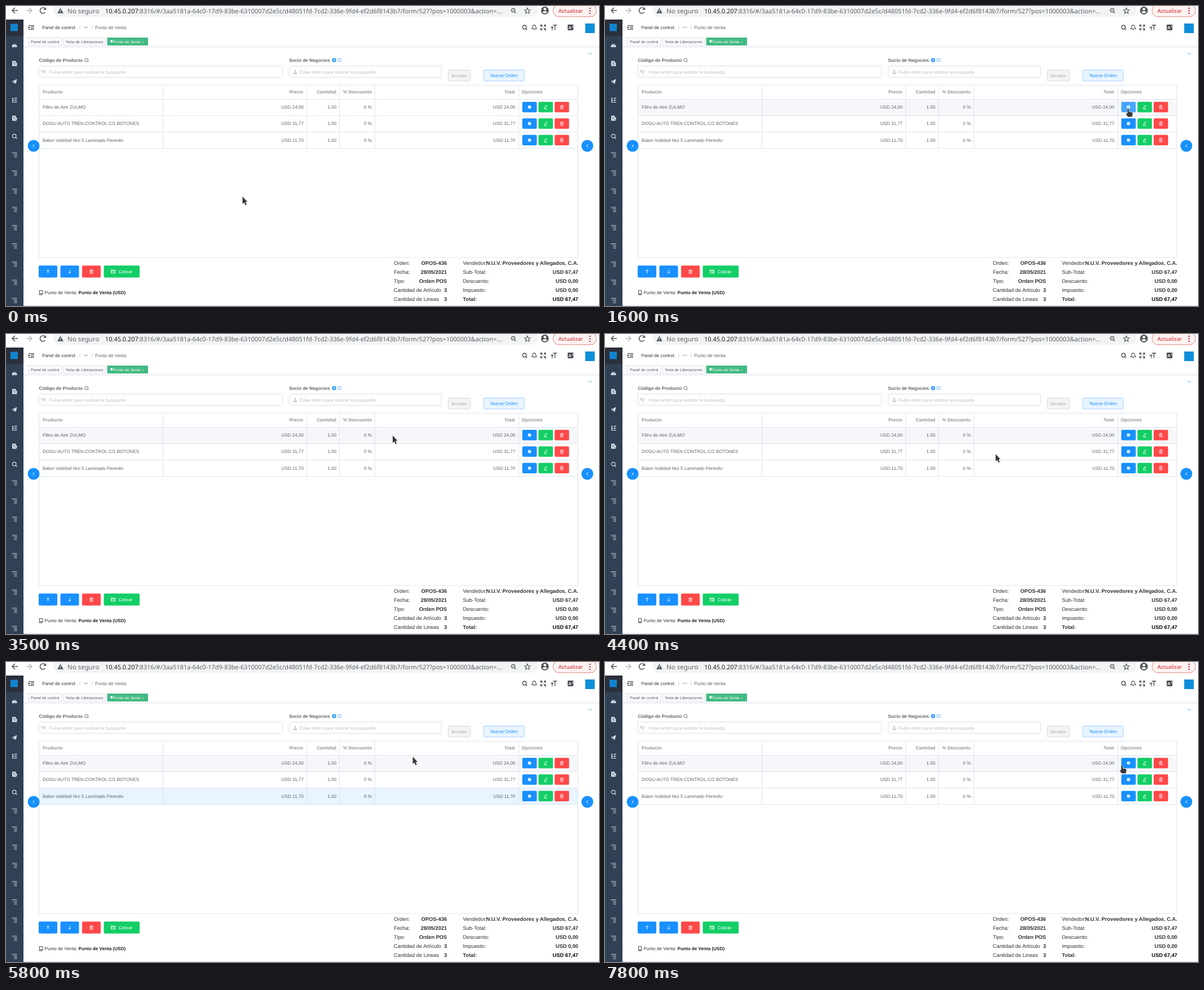
An HTML page for the animation above (8 s loop, 1052 by 532 pixels).

```html
<!DOCTYPE html>
<html lang="es">
<head>
<meta charset="utf-8">
<title>Punto de Venta</title>
<style>
  html, body { margin: 0; width: 100%; height: 100%; overflow: hidden; background: #fff; }
  svg { display: block; width: 1052px; height: 532px; }
  text { font-family: "Liberation Sans", Arial, sans-serif; text-rendering: geometricPrecision; white-space: pre; }
  .chrome { font-family: "Noto Sans", "Open Sans", sans-serif; }
  .bold { font-weight: bold; }
</style>
</head>
<body>
<svg id="stage" viewBox="0 0 1052 532" xmlns="http://www.w3.org/2000/svg"></svg>
<script>
const BLUE = '#1890ff', GREEN = '#13ce66', RED = '#ff4949', GREY = '#606266', DARK = '#303133', LINE = '#dfe4ec';
const LOOP = 8000;
let out = '';

const rect = (x, y, w, h, fill, extra = '') => {
  out += `<rect x="${x}" y="${y}" width="${w}" height="${h}" fill="${fill}" ${extra}/>`;
};
const box = (x, y, w, h, fill, stroke, r = 2) => rect(x, y, w, h, fill, `stroke="${stroke}" rx="${r}"`);
const circle = (x, y, r, fill) => { out += `<circle cx="${x}" cy="${y}" r="${r}" fill="${fill}"/>`; };
const text = (x, y, s, fill = GREY, size = 8.15, cls = '', anchor = 'start') => {
  out += `<text x="${x}" y="${y}" fill="${fill}" font-size="${size}" class="${cls}" text-anchor="${anchor}">${s}</text>`;
};
const right = (x, y, s, fill, size, cls) => text(x, y, s, fill, size, cls, 'end');
const icon = (x, y, d, stroke, width = 1, fill = 'none') => {
  out += `<path transform="translate(${x} ${y})" d="${d}" stroke="${stroke}" stroke-width="${width}" fill="${fill}"/>`;
};
const solid = (x, y, d, fill) => icon(x, y, d, 'none', 0, fill);

const ICON = {
  search: 'M2.2 2.2L4.5 4.5M3-.4A3.3 3.3 0 1 1-3.6-.4A3.3 3.3 0 1 1 3-.4',
  smallSearch: 'M1.9 1.9L3.4 3.4M2.7-.2A2.9 2.9 0 1 1-3.1-.2A2.9 2.9 0 1 1 2.7-.2',
  trash: 'M-3-2H3M-1-2V-3.2H1V-2M-2.2-2V3.2H2.2V-2M-.7-.5V1.8M.7-.5V1.8',
  pencil: 'M-2 1L1-3 2.4-2-.6 2-2.3 2.5ZM-2.8 3.6H3',
  list: 'M-4.5-4H4.5M0-1.4H4.5M0 1.2H4.5M0 3.8H4.5M-2.5-1.4H-1.2M-1.3 1.2H-.8M-1.3 3.8H-.8',
  cart: 'M-4-3H-2.5L-1.5 1H2.5L3.5-2H-2M-1 3H-.5M2 3H2.5',
  user: 'M-1.8-2A1.8 1.8 0 1 1 1.8-2A1.8 1.8 0 1 1-1.8-2M-3.5 3.5Q-3.5 .5 0 .5T3.5 3.5Z',
  doc: 'M-3.5-4H2V-1H4V4H-3.5Z',
  left: 'M1.3-2.5L-1.3 0 1.3 2.5',
  right: 'M-1.3-2.5L1.3 0-1.3 2.5',
};

function browserBar() {
  rect(84, -6, 859, 25, '#f1f3f4', 'rx="12"');
  icon(16, 8, 'M5 0H-5M0-5L-5 0 0 5', '#55585c', 1.6);
  icon(41, 8, 'M-5 0H5M0-5L5 0 0 5', '#b9bbbe', 1.6);
  icon(65.5, 8, 'M4 3A5 5 0 1 1 3.6-3.5L4.6-2.2M4.8-5.2V-1.8H1.4', '#55585c', 1.6);
  solid(96.5, 8.5, 'M0-5L5.5 4.5H-5.5ZM-.6-1.8V1.2H.6V-1.8ZM-.6 2.2V3.4H.6V2.2Z', '#55585c');
  text(109, 13, 'No seguro', '#606367', 11.5, 'chrome');
  const path = ':8316/#/3aa5181a-64c0-17d9-83be-6310007d2e5c/d48051fd-7cd2-336e-9fd4-ef2d6f8143b7/form/527?pos=1000003&amp;action=...';
  text(176, 13, `<tspan fill="#202124">10.45.0.207</tspan>${path}`, '#606367', 10.92, 'chrome');
  icon(900, 8, ICON.search, '#55585c', 1.3);
  icon(900, 8, 'M-2-.4H1.4', '#55585c');
  icon(925, 8.5, 'M0-5L1.5-1.7 5-1.4 2.3 .9 3.2 4.5 0 2.6-3.2 4.5-2.3 .9-5-1.4-1.5-1.7Z', '#55585c', 1.2);
  circle(956, 8, 7, '#55585c');
  circle(956, 5.5, 2.3, '#fff');
  solid(956, 8, 'M-4.3 3Q0-1 4.3 3Q0 7-4.3 3Z', '#fff');
  box(970.5, -2.5, 77, 21.5, '#fdf3f2', '#d9817b', 10.5);
  text(980, 12.3, 'Actualizar', '#c5221f', 9.4, 'chrome');
  [4, 8.5, 13].forEach(y => circle(1036, y, 1.2, '#c5221f'));
}

function sidebar() {
  rect(0, 24, 31, 508, '#304156');
  rect(0, 24, 31, 29, '#2b2f3a');
  rect(8, 31.5, 13, 13, '#1285cf');
  const tint = '#dbe2ea';
  solid(15, 70, 'M-4.5 3A4.6 4.6 0 1 1 4.5 3ZM-.7 1.5H.7L1.7-2ZM-3 0H-2V1H-3ZM2.4 0H3.4V1H2.4Z', tint);
  icon(15, 102, ICON.doc, tint, 1, tint);
  icon(15, 102, 'M-2-1.5H1M-2 1H2.5', '#304156', 1);
  solid(15, 134, 'M4.5-4.5L2.5 4 0 2-1.5 4.2V1.2L2.5-2.5-2.3 .8-4.5-.3Z', tint);
  icon(15, 167, 'M-4-3.5H-2M0-3.5H4.5M-3-3V3.5H-1M-3 0H-1M0 0H4.5M0 3.5H4.5', tint, 1.3);
  icon(15, 199, ICON.doc, tint, 1, tint);
  icon(15, 199, 'M-2-1.5H1M-2 1H0M1 1L4 4', '#304156', 1);
  icon(15, 231, ICON.search, tint, 1.2);
  for (let i = 0; i < 9; i++) icon(15, 264 + i * 32.3, ICON.list, tint, .9);
}

function navbar() {
  icon(45, 38, 'M-5-3.5H5M-1-1.2H5M-1 1.2H5M-5 3.5H5M-4.8-1.6V1.6L-2.6 0Z', DARK, 1);
  text(64, 40.8, 'Panel de control', DARK);
  text(130, 40.8, '/', '#a0a5ae');
  [139, 141.6, 144.2].forEach(x => circle(x, 38, .8, GREY));
  text(151.5, 40.8, '/', '#a0a5ae');
  text(158, 40.8, 'Punto de Venta', GREY);

  icon(920, 38, ICON.search, '#45494f', 1.4);
  icon(937, 38, 'M-4.3 2.5H4.3L3 .8V-1A3 3 0 0 0-3-1V.8ZM-1 4.5H1M0-4V-5', '#45494f', 1.1);
  icon(953, 38, 'M-4.3-1.5V-4.3H-1.5M1.5-4.3H4.3V-1.5M4.3 1.5V4.3H1.5M-1.5 4.3H-4.3V1.5M-4-4L-1.2-1.2M4-4L1.2-1.2M4 4L1.2 1.2M-4 4L-1.2 1.2', '#45494f', 1.2);
  icon(972, 38, 'M-1.5-4H5.5M2-4V4.8M-5.5-.5H-.5M-3-.5V4.8', '#45494f', 1.3);
  rect(996.5, 33, 10, 10, '#45494f', 'rx="1"');
  text(997.8, 40.7, 'A', '#fff', 7.5, 'bold');
  icon(1004.5, 35.5, 'M-1 0H1.5M-1 2H1.5', '#fff', .7);
  rect(1027.5, 31, 17, 17, '#0e8ed8');

  box(39.5, 56.5, 59, 13, '#fff', '#d8dce5', 0);
  text(44, 65.5, 'Panel de control', '#495060', 7);
  box(102.5, 56.5, 73.5, 13, '#fff', '#d8dce5', 0);
  text(106.5, 65.5, 'Nota de Liberaciones', '#495060', 7);
  rect(179.5, 56, 72.5, 14, '#42b983');
  circle(187.3, 62.6, 2.3, '#fff');
  text(190.5, 65.5, 'Punto de Venta', '#fff', 7);
  icon(242.8, 63.6, 'M-1.2-1.2L1.2 1.2M1.2-1.2L-1.2 1.2', '#d5f0e3', .7);
  rect(31, 72, 1021, 1, '#d8dce5');
}

function orderForm() {
  icon(1036.5, 84.5, 'M-3.2-1.5L0 1.5 3.2-1.5', '#5aaef8', 1);
  text(58.5, 99, 'Código de Producto', GREY, 8.15, 'bold');
  icon(143, 96, ICON.smallSearch, GREY, .9);
  text(502, 99, 'Socio de Negocios', GREY, 8.15, 'bold');
  circle(582, 96, 3.6, BLUE);
  icon(582, 96, 'M-2 0H2M0-2V2', '#fff', .9);
  icon(591.5, 96, ICON.smallSearch, '#55aefc', .9);
  box(58.5, 106.5, 432, 20, '#fff', '#dcdfe6');
  box(502.5, 106.5, 270, 20, '#fff', '#dcdfe6');
  icon(66, 117, ICON.cart, '#b4b8c0', 1);
  solid(513, 117, ICON.user, '#c0c4cc');
  [77, 520.5].forEach(x => text(x, 119.7, 'Pulse enter para realizar la busqueda', '#bcc0c9'));
  box(784.5, 113.5, 39.5, 19.5, '#f4f4f5', '#d8d9dc');
  text(804.3, 126, 'Borrador', '#a3a5aa', 7, '', 'middle');
  box(847.5, 113.5, 72, 19.5, '#e8f4ff', '#a3d3ff');
  text(883.5, 126.3, 'Nueva Orden', BLUE, 8.2, '', 'middle');
}

function table() {
  for (let i = 0; i < 3; i++) rect(59, 165 + i * 29.2, 955, 29.2, '#fff', `id="row${i}"`);
  const lines = [279, 534, 592, 655, 910].map(x => `M${x - .5} 140V252`).join('');
  icon(0, 0, `M58.5 140.5H1014.5V446H58.5ZM59 165.5H1014M59 194.5H1014M59 223.5H1014M59 252.5H1014${lines}`, LINE);

  const head = (x, s, anchor) => text(x, 155.3, s, '#909399', 8.15, 'bold', anchor);
  head(65, 'Producto');
  head(527.5, 'Precio', 'end');
  head(586, 'Cantidad', 'end');
  head(649, '% Descuento', 'end');
  head(903, 'Total', 'end');
  head(915, 'Opciones');

  const items = [['Filtro de Aire ZULMO', '24,00'], ['DOGU AUTO TREN CONTROL C/2 BOTONES', '31,77'], ['Balon Voleibol Nro 5 Laminado Perevilo', '11,70']];
  items.forEach(([name, price], i) => {
    const mid = 179.2 + i * 29.3, y = mid + 2.8;
    text(65, y, name);
    right(528, y, 'USD ' + price);
    right(586, y, '1.00');
    right(649, y, '0 %');
    right(903.5, y, 'USD ' + price);
    rect(916, mid - 9.3, 25.6, 18.6, BLUE, `rx="1.8" id="info${i}"`);
    rect(944.7, mid - 9.3, 25.6, 18.6, GREEN, 'rx="1.8"');
    rect(973.3, mid - 9.3, 25.6, 18.6, RED, 'rx="1.8"');
    circle(928.7, mid, 2.9, '#fff');
    icon(928.7, mid, 'M0-2V-1M0-.4V2', BLUE, .9);
    icon(957.3, mid, ICON.pencil, '#fff', .8);
    icon(986, mid, ICON.trash, '#fff', .8);
  });

  circle(49, 248, 10.5, BLUE);
  icon(49, 248, ICON.right, '#fff', 1);
  circle(1031.3, 248, 10.5, BLUE);
  icon(1031.3, 248, ICON.left, '#fff', 1);
}

function footer() {
  [[58, 33, BLUE], [96.5, 33, BLUE], [135, 33, RED], [173.5, 63.5, GREEN]]
    .forEach(([x, w, fill]) => rect(x, 460.3, w, 21.3, fill, 'rx="1.8"'));
  icon(74.5, 471, 'M0 3.3V-3M-2.4-.6L0-3 2.4-.6', '#fff', .9);
  icon(113, 471, 'M0-3.3V3M-2.4 .6L0 3 2.4 .6', '#fff', .9);
  icon(151.5, 471, ICON.trash, '#fff', .9);
  icon(190, 471, 'M-3.5-2.7H3.5V2.7H-3.5ZM-3.5-1H3.5M1 1.2H2.4', '#fff', 1);
  text(199.7, 474, 'Cobrar', '#fff');

  icon(62, 508.3, 'M-2.6-3.8H2.6V3.8H-2.6ZM-2.6 2H2.6', DARK, .9);
  text(68.5, 511, 'Punto de Venta: <tspan class="bold" fill="#1c1d20">Punto de Venta (USD)</tspan>', DARK);

  const summary = [
    ['Orden:', 'OPOS-436', 'Vendedor:', 'N.U.V. Proveedores y Allegados, C.A.'],
    ['Fecha:', '28/05/2021', 'Sub-Total:', 'USD 67,47'],
    ['Tipo:', 'Orden POS', 'Descuento:', 'USD 0,00'],
    ['Cantidad de Artículo', '3', 'Impuesto:', 'USD 0,00'],
    ['Cantidad de Lineas', '3', 'Total:', 'USD 67,47'],
  ];
  summary.forEach(([a, b, c, d], i) => {
    const y = 459.3 + i * 15.9, last = i === 4;
    text(688, y, a, DARK, 9.3);
    right(782.3, y, b, DARK, 9.3, 'bold');
    text(810.5, y, c, DARK, 9.3, last ? 'bold' : '');
    right(1015.3, y, d, last ? '#000' : DARK, 9.3, 'bold');
  });
  rect(31, 531, 1021, 1, '#d9dde3');
}

[browserBar, sidebar, navbar, orderForm, table, footer].forEach(draw => draw());
out += '<path id="cursor" fill="#37383a" stroke="#fff" stroke-width="1" paint-order="stroke"/>';
const stage = document.getElementById('stage');
stage.innerHTML = out;
const find = id => document.getElementById(id);

const ARROW = 'M0 0V13L2.9 10.4 5 15.3 7.2 14.3 5.1 9.6 8.6 9.2Z';
const HAND = 'M-1.3 .8Q0-.8 1.3 .8V5.5L6.8 6.8Q8.2 7.3 8 9L7 14.5H-.5L-3.8 9.5Q-3.7 7.8-1.3 9.2Z';

// time, x, y, pointing hand
const moves = [
  [0, 419.6, 338], [500, 760, 334], [600, 1041, 330],
  [900, 1030, 300], [1000, 1012, 258], [1100, 992, 212], [1200, 970, 168], [1300, 952, 148],
  [1400, 940, 160], [1500, 932, 174, 1], [1600, 928, 182, 1],
  [2400, 921, 184, 1], [2500, 929, 184, 1], [2700, 800, 180], [2800, 685, 178], [3500, 686, 180],
  [3700, 692, 202], [4400, 693, 213], [4600, 693.6, 236], [4900, 700, 240], [5500, 721.6, 168],
  [7200, 780, 174], [7300, 858, 184], [7500, 885, 182], [7700, 902, 181], [7800, 917, 183, 1],
];
const HOVER = '#f5f7fa';
const rowFills = [
  [[0, '#fff'], [1500, HOVER], [4600, '#fff'], [5500, HOVER]],
  [[0, '#fff'], [4600, '#f2f6fa'], [5500, '#fff']],
  [[0, '#fff'], [5500, '#f0f7ff'], [5800, '#e8f4ff'], [6600, '#fff']],
];
const infoFill = [[0, BLUE], [1600, '#46a6ff'], [2700, BLUE]];

const at = (steps, t) => steps.filter(s => s[0] <= t).pop();

function frame(now) {
  const t = now % LOOP;
  const [, x, y, hand] = at(moves, t);
  find('cursor').setAttribute('d', hand ? HAND : ARROW);
  find('cursor').setAttribute('transform', `translate(${x} ${y})`);
  rowFills.forEach((fills, i) => find('row' + i).setAttribute('fill', at(fills, t)[1]));
  find('info0').setAttribute('fill', at(infoFill, t)[1]);
  requestAnimationFrame(frame);
}
frame(0);
</script>
</body>
</html>
```
